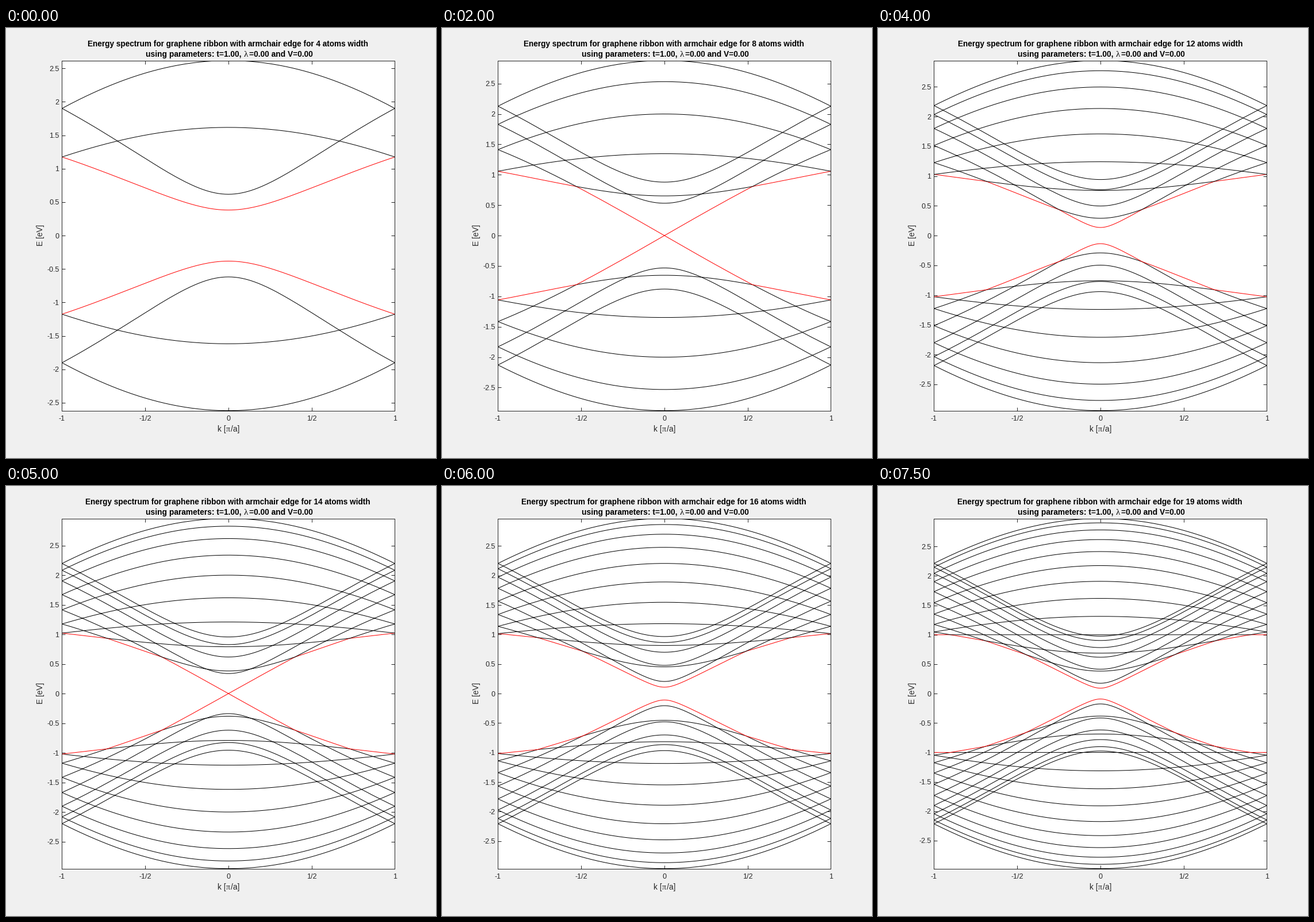
These frames come from a looping animation (748x748 px, 8 s). A matplotlib script:

```python
import numpy as np
import matplotlib.pyplot as plt
from matplotlib.animation import FuncAnimation

SIZE, DPI = 748, 100
PX = 72 / DPI  # one pixel in points
LEFT, RIGHT, TOP, BOTTOM = 97.4, 676.4, 56.6, 665.6
WIDTHS = range(4, 20)
GRAY = "#262626"

plt.rcParams["font.family"] = "Liberation Sans"

k = np.linspace(-1, 1, 201)


def bands(n):
    """Sorted energy bands of an armchair ribbon n atoms wide."""
    c = np.cos(np.arange(1, n + 1) * np.pi / (n + 1))[:, None]
    e = np.sqrt(np.abs(1 + 4 * c**2 + 4 * c * np.cos(np.pi * k / 2)))
    return np.sort(np.vstack([-e, e]), axis=0)


fig = plt.figure(figsize=(SIZE / DPI, SIZE / DPI), dpi=DPI, facecolor="#f0f0f0")
ax = fig.add_axes([LEFT / SIZE, 1 - BOTTOM / SIZE,
                   (RIGHT - LEFT) / SIZE, (BOTTOM - TOP) / SIZE])


def label(x, y, s, size=13.7, **kw):
    """Text with its baseline at pixel (x, y) from the top left."""
    kw = {"color": GRAY, "va": "baseline", **kw}
    return fig.text(x / SIZE, 1 - y / SIZE, s, fontsize=size * PX, **kw)


for spine in ax.spines.values():
    spine.set(color=GRAY, linewidth=PX)
ax.set_xlim(-1, 1)
ax.set_xticks(np.linspace(-1, 1, 5), ["-1", "-1/2", "0", "1/2", "1"])
yticks = np.arange(-2.5, 3, 0.5)
ax.set_yticks(yticks, [f"{v:g}" for v in yticks])
ax.tick_params(direction="in", top=True, right=True, length=6 * PX,
               width=PX, color=GRAY, labelcolor=GRAY, labelsize=12.5 * PX)
ax.tick_params(axis="x", pad=8.4 * PX)
ax.tick_params(axis="y", pad=5 * PX)

bold = dict(color="black", weight="bold")
title = label(386.3, 32, "", size=13.65, ha="center", **bold)
label(243, 50, "using parameters: t=1.00,", **bold)
label(413.5, 50, "λ", size=15, family="Liberation Serif", color="black")
label(533.5, 50, "=0.00 and V=0.00", ha="right", **bold)

label(367.5, 702, "k [")
label(382.5, 702, "π", family="Liberation Serif")
label(406.5, 702, "/a]", ha="right")
label(64, 360.5, "E [eV]", ha="center", rotation=90, rotation_mode="anchor")

lines = [ax.plot([], [], lw=PX)[0] for _ in range(2 * WIDTHS[-1])]


def update(i):
    n = WIDTHS[i]
    energy = bands(n)
    title.set_text("Energy spectrum for graphene ribbon with armchair edge "
                   f"for {n} atoms width")
    for j, line in enumerate(lines):
        if j < 2 * n:
            line.set_data(k, energy[j])
            line.set_color("red" if j in (n - 1, n) else "black")
        else:
            line.set_data([], [])
    top = energy.max()
    ax.set_ylim(-top, top)
    return lines


anim = FuncAnimation(fig, update, frames=len(WIDTHS), interval=500,
                     repeat=True, repeat_delay=0, blit=False)
plt.show()
```
